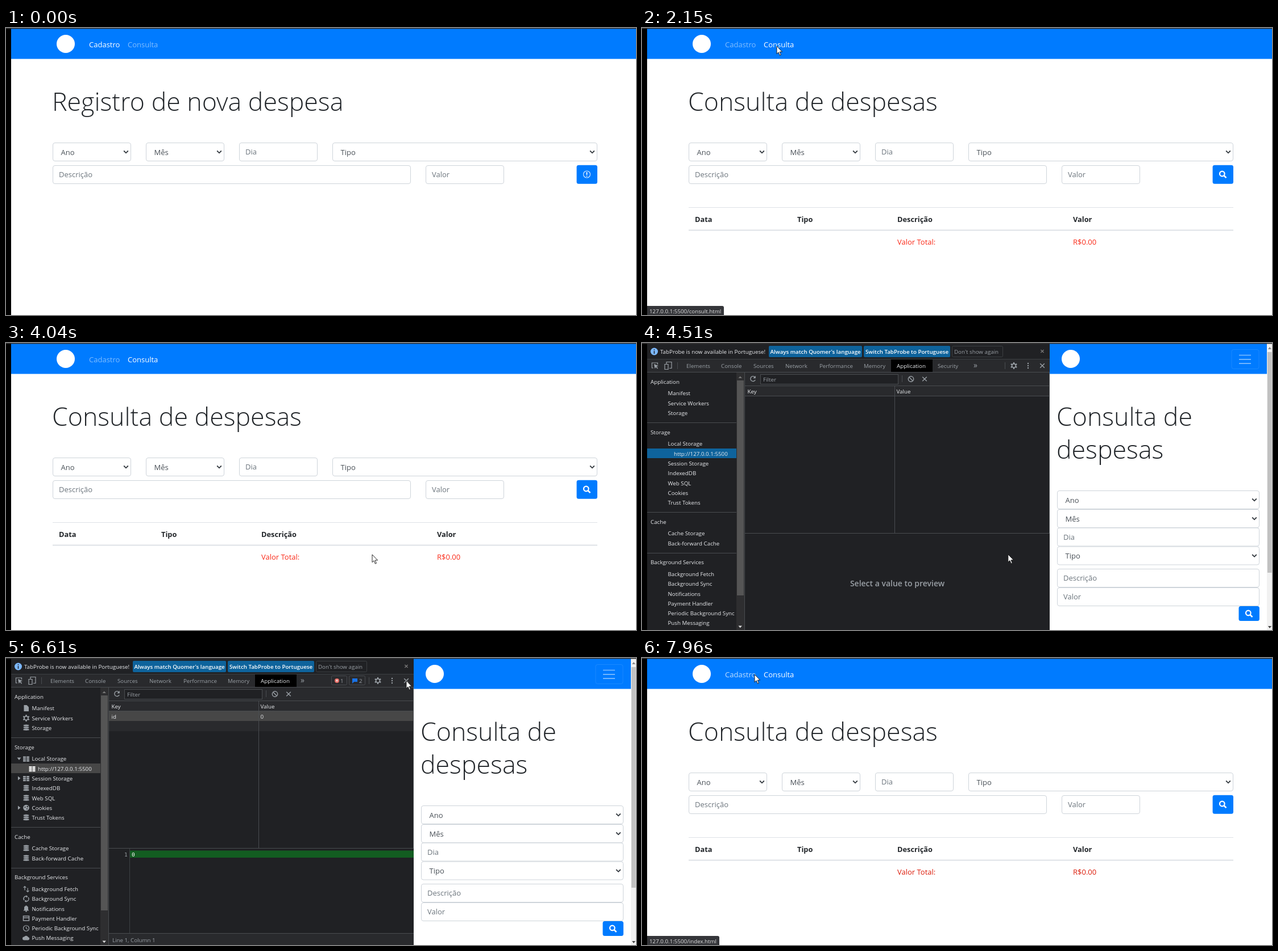
Write an HTML page that moves like this. It is 1108x506 px and loops after 8 s.

```html
<!DOCTYPE html>
<html lang="pt">
<head>
<meta charset="utf-8">
<title>Controle de despesas</title>
<style>
html, body { margin: 0; width: 100%; height: 100%; overflow: hidden; background: #fff; }
svg { display: block; width: 100%; height: 100%; font: 13px "Open Sans", "Noto Sans", sans-serif; }
.title { font-size: 44.7px; font-weight: 300; }
.head { font-size: 12.8px; font-weight: 700; }
.small { font-size: 9.75px; }
.strong { font-weight: 600; }
.mono { font: 9.5px "DejaVu Sans Mono", monospace; }
</style>
</head>
<body>
<svg id="stage" viewBox="0 0 1108 506"></svg>
<script>
const BLUE = '#007bff', INK = '#212529', GREY = '#9aa0a6', LIGHT = '#e8eaed', EDGE = '#494c50', PICK = '#0e639c';

// Drawing helpers
const text = (x, y, s, fill = INK, attrs = '') => `<text x="${x}" y="${y}" fill="${fill}" ${attrs}>${s}</text>`;
const rect = (x, y, w, h, fill, attrs = '') => `<rect x="${x}" y="${y}" width="${w}" height="${h}" fill="${fill}" ${attrs}/>`;
const line = (d, stroke = EDGE, w = 1, attrs = '') => `<path d="${d}" fill="none" stroke="${stroke}" stroke-width="${w}" ${attrs}/>`;
const shape = (d, fill = GREY) => `<path d="${d}" fill="${fill}"/>`;
const disc = (x, y, r, fill, attrs = '') => `<circle cx="${x}" cy="${y}" r="${r}" fill="${fill}" ${attrs}/>`;
const ring = (x, y, r, stroke, w) => disc(x, y, r, 'none', `stroke="${stroke}" stroke-width="${w}"`);
const group = (id, body, attrs = '') => `<g id="${id}" ${attrs}>${body}</g>`;
const at = (x, y, body) => `<g transform="translate(${x} ${y})">${body}</g>`;
const cross = (x, y, r, color = GREY) => line(`M${x - r} ${y - r}l${2 * r} ${2 * r}m0 ${-2 * r}l${-2 * r} ${2 * r}`, color, 1.4);

// Form parts
const box = (x, y, w) => rect(x + .5, y + .5, w - 1, 32, '#fff', 'rx="3.5" stroke="#ced4da"');
const input = (x, y, w, label) => box(x, y, w) + text(x + 11, y + 21.3, label, '#6c757d');
const select = (x, y, w, label) => box(x, y, w) + text(x + 14.5, y + 21.8, label, '#495057') +
  line(`M${x + w - 12.8} ${y + 14.5}l3.8 3.8l3.8 -3.8`, '#343a40', 1.8);
const magnifier = (x, y) => ring(x - 1.2, y - 1, 4.3, '#fff', 2.2) + line(`M${x + 2} ${y + 2.2}l4 4`, '#fff', 2.6);
const button = (y, h, x = 1003.6) => rect(x, y, 36.4, h, BLUE, 'rx="3.5"');
const logo = x => disc(x, 28, 16, '#fff');

const wideBase = rect(9, 1, 1099, 53.5, BLUE) + logo(105) +
  text(146, 33.6, 'Cadastro', '#fff', 'id="linkNew"') + text(214, 33.6, 'Consulta', '#fff', 'id="linkList"') +
  select(82, 202, 138, 'Ano') + select(246, 202, 138, 'Mês') + input(410, 202, 138, 'Dia') +
  select(574, 202, 466, 'Tipo') + input(82, 242, 630, 'Descrição') + input(738, 242, 138, 'Valor') + button(241.7, 33);

const registerPage = text(81, 145.5, 'Registro de nova despesa', INK, 'class="title"') +
  ring(1021.5, 258, 6, '#d6eaff', 1.1) +
  line('M1021.5 254v5m0 1.5v1.5', '#fff', 1.7, 'id="mark"');

const consultPage = text(81, 145.5, 'Consulta de despesas', INK, 'class="title"') + magnifier(1021.5, 258) +
  line('M82 316.5H1040', '#dee2e6') + line('M82 356.5H1040', '#dee2e6', 1.8) +
  [[93, 'Data'], [273, 'Tipo'], [449, 'Descrição'], [758, 'Valor']]
    .map(([x, s]) => text(x, 342, s, INK, 'class="head"')).join('') +
  group('total', text(449, 382.3, 'Valor Total:', 'currentColor') + text(758, 382.3, 'R$0.00', 'currentColor'));

const narrowPage = rect(717, 0, 391, 506, '#fff') + rect(717, 1, 382, 53.5, BLUE) + logo(754) +
  rect(1037, 11.5, 48, 34, 'none', 'rx="3.5" stroke="#fff" stroke-opacity=".1"') +
  line('M1050 21.5h21m-21 7.3h21m-21 7.3h21', '#80bdff', 1.7) +
  text(729, 145.5, 'Consulta de', INK, 'class="title"') + text(729, 203.5, 'despesas', INK, 'class="title"') +
  select(730, 260, 356, 'Ano') + select(730, 293, 356, 'Mês') + input(730, 325.5, 356, 'Dia') +
  select(730, 358.5, 356, 'Tipo') + input(730, 398, 356, 'Descrição') + input(730, 431, 356, 'Valor') +
  button(464, 26, 1049.5) + magnifier(1067.5, 477) +
  rect(1099, 1, 9, 505, '#f1f1f1') + rect(1100, 16, 7.5, 389, '#c1c1c1') +
  shape('M1101 11l3-4l3 4z', '#888') + shape('M1101 499l3 4l3-4z', '#444');

// Sidebar icons, centred on the origin
const icons = {
  doc: shape('M-4-5.5h5l3.5 3.5v7.5h-8.5z'),
  gear: ring(0, 0, 3.4, GREY, 1.7) + [0, 60, 120].map(a => `<g transform="rotate(${a})">${line('M0-6v2.4M0 3.6V6', GREY, 2.2)}</g>`).join(''),
  db: [-4, -.5, 3].map(y => `<ellipse cy="${y}" rx="5" ry="1.9" fill="${GREY}" stroke="#202124" stroke-width=".5"/>`).join('') + rect(-5, 3, 10, 1.2, GREY),
  grid: [-4, -.7, 2.6].map(y => rect(-5.5, y, 5, 2.6, 'currentColor') + rect(.5, y, 5, 2.6, 'currentColor')).join(''),
  cookie: disc(0, 0, 5.3, GREY) + disc(-2, -1, 1, '#202124') + disc(1.5, 2, 1, '#202124') + disc(2.2, -2, 1.2, '#202124'),
  arrows: line('M-2.5 2v-7m-2.3 2.3l2.3-2.3l2.3 2.3M2.7-2v7m-2.3-2.3l2.3 2.3l2.3-2.3', GREY, 1.2),
  sync: line('M-3.5 2.5A4.2 4.2 0 0 1 1-4.2M3.5-2.5A4.2 4.2 0 0 1-1 4.2', GREY, 1.4) + shape('M0-6.5l3 2.4l-3 2.4zM0 6.5l-3-2.4l3-2.4z'),
  bell: shape('M-5 3.5l1.5-2v-3a3.5 3.5 0 0 1 7 0v3l1.5 2z') + disc(0, 4.5, 1.3, GREY) + disc(0, -4.8, 1, GREY),
  card: line('M-5-4h10v8h-10zM-5-1h10', GREY, 1.5),
  clock: ring(0, 0, 5, GREY, 1.2) + line('M0-3v3.3l2.3 1.4', GREY, 1.1),
  cloud: shape('M-3.5 4a3 3 0 0 1 0-6a4 4 0 0 1 7 .5a2.8 2.8 0 0 1 0 5.5z')
};
const items = [
  [88.5, 'Manifest', 'doc'], [106, 'Service Workers', 'gear'], [123, 'Storage', 'db'],
  [177.5, 'Local Storage', 'grid'], [212, 'Session Storage', 'grid'], [229.5, 'IndexedDB', 'db'],
  [247, 'Web SQL', 'db'], [264, 'Cookies', 'cookie'], [281.5, 'Trust Tokens', 'db'],
  [335.5, 'Cache Storage', 'db'], [353, 'Back-forward Cache', 'db'],
  [407.5, 'Background Fetch', 'arrows'], [424.5, 'Background Sync', 'sync'], [442, 'Notifications', 'bell'],
  [459, 'Payment Handler', 'card'], [476.5, 'Periodic Background Sync', 'clock'], [493.5, 'Push Messaging', 'cloud']
];
const sections = [[68, 'Application'], [157, 'Storage'], [315, 'Cache'], [386.5, 'Background Services']];
const tabs = [[78, 'Elements'], [139, 'Console'], [196, 'Sources'], [252, 'Network'], [312, 'Performance'], [390, 'Memory']];

const infoBar = disc(21.5, 15, 6.5, '#7cb8ff') + line('M21.5 11v1.7m0 1.3v5', '#202124', 1.5) +
  text(32, 18.8, 'TabProbe is now available in Portuguese!', LIGHT) +
  rect(223, 5, 164, 20, PICK, 'rx="2"') + rect(390, 5, 152, 20, PICK, 'rx="2"') +
  rect(545.5, 5.5, 89, 19, '#202124', 'rx="2" stroke="#3c4043"') +
  text(225.5, 18.8, "Always match Quomer's language", '#fff', 'class="strong"') +
  text(393, 18.8, 'Switch TabProbe to Portuguese', '#fff', 'class="strong"') +
  text(549, 18.8, "Don't show again", GREY) + cross(704, 14.5, 2.6, '#777') + line('M9 28.5H717', '#3c4043');

const toolBar = rect(9, 29, 708, 22, '#292a2d') +
  line('M20 44h-2.5v-9h10v3', GREY, 1.2) + shape('M21 37l8 3.3l-3.4 1.2l2.6 3l-1.2 1l-2.7-3l-1.6 3z') +
  line('M43 37v-3.5h9v11h-4M40 37.5h6v9h-6z', GREY, 1.2) +
  line('M62.5 34v12M638.5 34v12', EDGE) +
  tabs.map(([x, s]) => text(x, 44, s, GREY)).join('') +
  rect(438, 29, 73, 22, '#000') + text(448, 44, 'Application', LIGHT) +
  at(654, 40, icons.gear) + [-4, 0, 4].map(d => disc(679, 40 + d, 1.2, GREY)).join('') + cross(704, 40, 3.8) + line('M9 51.5H717');

const storageTable = rect(181, 52, 536, 23, '#292a2d') +
  line('M198.4 60A4.4 4.4 0 1 0 199.2 65', GREY, 1.4) + shape('M199.8 57.8v4.4h-4.4z') +
  rect(208.5, 55.5, 242, 17, '#202124', `stroke="${EDGE}"`) + text(213, 67.8, 'Filter', GREY) +
  line('M457.5 57v12') + ring(473, 63.5, 4.7, GREY, 1.4) + line('M469.8 60.3l6.4 6.4', GREY, 1.4) + cross(497, 63.5, 3.8) +
  rect(181, 75, 536, 19, '#292a2d') + line('M181 75.5H717M181 93.5H717') +
  text(185.5, 89, 'Key', LIGHT) + text(447.5, 89, 'Value', LIGHT);

const sideBar = line('M9 140.5H166M9 298.5H166M9 370.5H166') +
  rect(9, 186, 157, 17, PICK, 'id="picked"') + text(56, 198.6, 'http://127.0.0.1:5500', LIGHT) +
  sections.map(([y, s]) => text(15, y + 3.6, s, LIGHT)).join('') +
  items.map(([y, s]) => text(45.5, y + 3.6, s, LIGHT)).join('') +
  rect(166, 52, 14, 454, '#2e2e30') + rect(167, 66, 12, 379, '#555') +
  shape('M169.5 62l3.2-3.5l3.2 3.5z', '#777') + shape('M169.5 498.5l3.2 3.7l3.2-3.7z', '#ddd') + line('M180.5 52V506');

const emptyState = text(520, 44, 'Security', GREY) + text(583, 44, '»', GREY, 'font-size="14"') +
  text(449, 428.6, 'Select a value to preview', GREY, 'font-size="14" class="strong" text-anchor="middle"');

const loadedState = text(518, 44, '»', GREY, 'font-size="14"') +
  rect(572.5, 31.5, 27, 16, 'none', `stroke="${EDGE}" rx="2"`) + rect(603.5, 31.5, 28, 16, 'none', `stroke="${EDGE}" rx="2"`) +
  disc(582, 40, 4, '#e46962') + cross(582, 40, 1.5, '#fff') + text(588, 43.7, '1', GREY) +
  shape('M609 36h9v6h-6l-3 3z', '#1a73e8') + text(621, 43.7, '2', GREY) +
  rect(181, 94, 536, 17, '#474747') + rect(181, 111, 536, 18, '#292a2d') +
  text(185.5, 107, 'id', LIGHT) + text(447.5, 107, '0', LIGHT) +
  rect(218, 339.5, 499, 12.5, '#135d21') + line('M217.5 336V486', '#3c4043') +
  text(208, 349.8, '1', GREY, 'class="mono"') + text(221, 349.8, '0', '#fff', 'class="mono"') +
  rect(181, 486, 536, 20, '#292a2d') + line('M181 485.5H717') + text(187, 501, 'Line 1, Column 1', GREY) +
  `<g color="${GREY}">${items.map(([y, , kind]) => at(35.5, y, icons[kind])).join('')}</g>` +
  `<g color="#fff">${at(46, 195, icons.grid)}</g>` +
  shape('M19.5 175.5h7l-3.5 4.5zM21 208.5l4.5 3.5l-4.5 3.5zM21 260.5l4.5 3.5l-4.5 3.5z');

document.getElementById('stage').innerHTML = rect(0, 0, 1108, 506, '#fff') +
  group('wide', wideBase + group('register', registerPage) + group('consult', consultPage)) +
  group('split', narrowPage + group('panel', rect(9, 1, 708, 505, '#202124') + infoBar + toolBar + storageTable + sideBar +
    group('empty', emptyState) + group('loaded', loadedState) +
    line('M444.5 75V335M181 335.5H717M716.5 52V335'), 'class="small"')) +
  group('status', rect(0, 490, 144, 20, '#35363a', 'id="statusBox" rx="3"') +
    text(13, 502.8, '', '#e0e0e0', 'id="statusText"'), 'class="small"') +
  rect(0, 0, 9, 506, '#000') + rect(0, 0, 1108, 1.5, '#333') +
  group('cursor', `<path d="M0 0V13.6L3.1 10.8L5.3 16.2L7.4 15.3L5.2 10H9.6Z" fill="#fff" stroke="#111" stroke-width=".9"/>`);

const el = id => document.getElementById(id);
const show = (id, on) => el(id).style.display = on ? '' : 'none';
const ramp = (t, a, b) => Math.min(1, Math.max(0, (t - a) / (b - a)));

// Pointer path: time, x, y
const path = [
  [0, 822, 520], [70, 820, 500], [340, 800, 350], [830, 1017, 256], [900, 1017, 256],
  [1390, 273, 53], [1670, 237, 32], [2540, 237, 32], [2860, 688, 414], [3000, 693, 386],
  [3290, 660, 368], [3430, 660, 368], [3700, 600, 365], [4040, 644, 373], [4510, 644, 373],
  [4620, 630, 342], [5060, 380, 117], [5200, 326, 111], [5330, 326, 111], [5400, 324, 106],
  [5660, 324, 106], [5930, 735, 71], [6070, 735, 71], [6610, 704, 40], [6680, 704, 40],
  [6750, 708, 47], [7120, 340, 40], [7490, 193, 31], [7560, 193, 31], [7630, 198, 29], [8000, 198, 29]
];
function pointer(t) {
  const i = path.findIndex(p => p[0] > t);
  const [t0, x0, y0] = path[i - 1], [t1, x1, y1] = path[i];
  const k = (t - t0) / (t1 - t0);
  return [x0 + (x1 - x0) * k, y0 + (y1 - y0) * k];
}

function draw(now) {
  const t = now % 8000;
  const consulting = t >= 2010, split = t >= 4300 && t < 6750, loaded = t >= 4580, late = t >= 6750;
  show('wide', !split);
  show('split', split);
  show('register', !consulting);
  show('consult', consulting);
  show('empty', !loaded);
  show('loaded', loaded);

  el('mark').style.opacity = t < 830 ? 1 : .4;
  el('linkNew').style.fillOpacity = !consulting ? 1 : .5 + .25 * ramp(t, 7760, 7900);
  el('linkList').style.fillOpacity = consulting ? 1 : .5 + .25 * ramp(t, 1530, 1670);
  el('total').style.color = late ? '#dc1c0a' : '#fa2a18';
  el('picked').style.fill = t < 6070 ? PICK : '#474747';

  el('status').style.opacity = late ? ramp(t, 7780, 7930) : ramp(t, 1600, 1780) * (1 - ramp(t, 2860, 3060));
  el('statusText').textContent = `127.0.0.1:5500/${late ? 'index' : 'consult'}.html`;
  el('statusBox').setAttribute('width', late ? 136 : 144);

  el('cursor').setAttribute('transform', `translate(${pointer(t)})`);
  requestAnimationFrame(draw);
}
requestAnimationFrame(draw);
</script>
</body>
</html>
```
